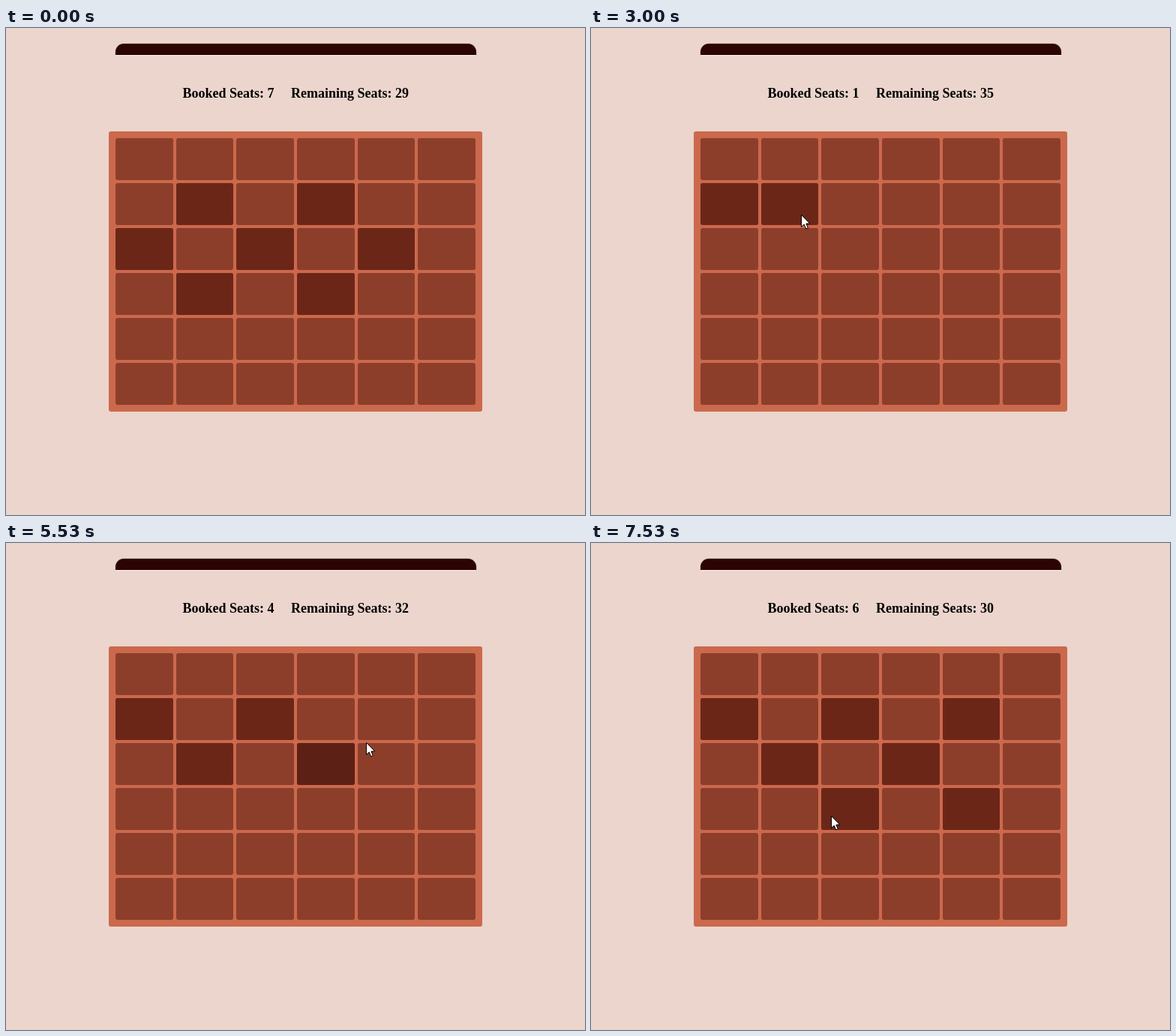
These frames come from a looping animation (772 px wide and 650 px high, 8 s). An HTML page with a canvas:

```html
<!DOCTYPE html>
<html lang="en">
<head>
<meta charset="utf-8">
<title>Seat booking</title>
<style>
  html, body { margin: 0; width: 100%; height: 100%; overflow: hidden; background: #ebd5cd; }
  canvas { display: block; }
</style>
</head>
<body>
<canvas id="stage" width="772" height="650"></canvas>
<script>
const ctx = document.getElementById('stage').getContext('2d', { alpha: false });
const LOOP = 8000, TICK = 200 / 3;
const SIZE = 6, SEAT_W = 230 / 3, SEAT_H = 56, STEP_X = 242 / 3, STEP_Y = 60;
const RELOAD = 27, ARRIVE = 31, STATUS_ON = 21, STATUS_OFF = 35;
const COLOR = {
  page: '#ebd5cd', bar: '#2d0404', panel: '#cb694d',
  free: '#8d3e2b', taken: '#6c2617', deep: '#5c2014'
};

// The pointer leaves for each stop at a tick; leaving a stop clicks the seat there
const STOPS = [
  { at: 30, ticks: 5, x: 190, y: 248 },
  { at: 44, ticks: 4, x: 346, y: 249, deep: true },
  { at: 56, ticks: 4, x: 264, y: 310 },
  { at: 68, ticks: 4, x: 412, y: 310, deep: true },
  { at: 80, ticks: 6, x: 490, y: 260 },
  { at: 93, ticks: 5, x: 536, y: 370 },
  { at: 106, ticks: 7, x: 320, y: 364 }
];
const ORIGIN = { x: 258, y: 256 };

const clamp = v => Math.max(0, Math.min(1, v));
const easeOut = p => 1 - (1 - p) ** 3;
const seatX = c => Math.round(146 + c * STEP_X);
const seatRight = c => Math.round(146 + c * STEP_X + SEAT_W);
const seatY = r => 147 + r * STEP_Y;

function pointer(tick) {
  if (tick >= 4 && tick <= 8) {
    const p = (tick - 4) / 4;
    return { x: 71 - 10 * p, y: 7 + 87 * Math.sin(Math.PI * p) };
  }
  const i = STOPS.findLastIndex(s => tick >= s.at);
  if (i < 0) return null;
  const from = STOPS[i - 1] || ORIGIN, to = STOPS[i];
  const e = easeOut(clamp((tick - to.at) / to.ticks));
  return {
    x: Math.round(from.x + (to.x - from.x) * e),
    y: Math.round(from.y + (to.y - from.y) * e)
  };
}

function seatAt({ x, y }) {
  const c = Math.floor((x - 146) / STEP_X), r = Math.floor((y - 147) / STEP_Y);
  const inside = x < seatRight(c) && y < seatY(r) + SEAT_H;
  return inside ? r * SIZE + c : -1;
}

// Seat number -> tick of its click
const clicks = new Map(STOPS.slice(0, -1).map((s, i) => [seatAt(s), STOPS[i + 1].at]));
const deepSpans = new Map(STOPS.flatMap((s, i) =>
  s.deep ? [[seatAt(s), [s.at + s.ticks, STOPS[i + 2].at]]] : []));

const bookedBefore = (r, c) => r > 0 && r < 4 && c < 5 && (r + c) % 2 === 0;

function hovered(tick) {
  if (tick < ARRIVE) return -1;
  const seat = seatAt(pointer(tick));
  return seat >= 0 ? seat : seatAt(pointer(tick - 1));
}

function box(x, y, w, h, radius, fill) {
  ctx.beginPath();
  ctx.roundRect(x, y, w, h, radius);
  ctx.fillStyle = fill;
  ctx.fill();
}

function drawScreen() {
  box(145.5, 20.3, 482, 16.2, [12, 12, 0, 0], '#c2b0aa');
  box(146, 21, 481, 15, [11, 11, 0, 0], COLOR.bar);
  ctx.fillStyle = '#fbf3f0';
  ctx.fillRect(146, 36, 481, 1);
}

function drawCounter(booked) {
  ctx.font = 'bold 18px "Liberation Serif", serif';
  ctx.fillStyle = '#000';
  ctx.fillText(`Booked Seats: ${booked}`, 235.5, 93);
  ctx.fillText(`Remaining Seats: ${SIZE * SIZE - booked}`, 380, 93);
}

function drawSeats(tick) {
  const hover = hovered(tick);
  const fade = clamp((RELOAD + 2 - tick) / 3);
  box(137, 138, 498, 374, 3, COLOR.panel);
  for (let id = 0; id < SIZE * SIZE; id++) {
    const r = Math.floor(id / SIZE), c = id % SIZE;
    const seat = fill => box(seatX(c), seatY(r), seatRight(c) - seatX(c), SEAT_H, 3, fill);
    const [deepFrom, deepTo] = deepSpans.get(id) || [];
    seat(COLOR.free);
    if (tick >= deepFrom && tick < deepTo) seat(COLOR.deep);
    else if (id === hover || tick >= clicks.get(id)) seat(COLOR.taken);
    else if (bookedBefore(r, c)) {
      ctx.globalAlpha = fade;
      seat(COLOR.taken);
      ctx.globalAlpha = 1;
    }
  }
}

function drawStatus(tick) {
  if (tick < STATUS_ON || tick >= STATUS_OFF) return;
  ctx.globalAlpha = tick < ARRIVE ? 1 : (STATUS_OFF - tick) / 8;
  box(-5, 628, 261, 30, [0, 4, 0, 0], '#dee1e6');
  ctx.beginPath();
  ctx.roundRect(-4.5, 628.5, 260, 30, [0, 3.5, 0, 0]);
  ctx.strokeStyle = '#c3bfc1';
  ctx.lineWidth = 1;
  ctx.stroke();
  ctx.font = '11.4px "Open Sans", sans-serif';
  ctx.fillStyle = '#4b4e54';
  ctx.fillText('Waiting for cache...', 5, 644);
  ctx.globalAlpha = 1;
}

function drawPointer(point) {
  if (!point) return;
  ctx.save();
  ctx.translate(point.x + 0.5, point.y + 0.5);
  const arrow = new Path2D('M0 0V16L3.7 12.6L6.2 18.5L8.8 17.4L6.4 11.6L11.2 11.4Z');
  ctx.fillStyle = '#fff';
  ctx.fill(arrow);
  ctx.strokeStyle = '#000';
  ctx.lineWidth = 1;
  ctx.stroke(arrow);
  ctx.restore();
}

function draw(time) {
  const tick = Math.floor((time % LOOP + 5) / TICK);
  const booked = tick < RELOAD ? 7 : [...clicks.values()].filter(t => tick >= t).length;
  ctx.fillStyle = COLOR.page;
  ctx.fillRect(0, 0, 772, 650);
  drawScreen();
  drawCounter(booked);
  drawSeats(tick);
  drawStatus(tick);
  if (tick < RELOAD || tick >= ARRIVE) drawPointer(pointer(tick));
}

let start;
function frame(now) {
  start ??= now;
  draw(Math.max(0, now - start));
  requestAnimationFrame(frame);
}
draw(0);
requestAnimationFrame(frame);
</script>
</body>
</html>
```
